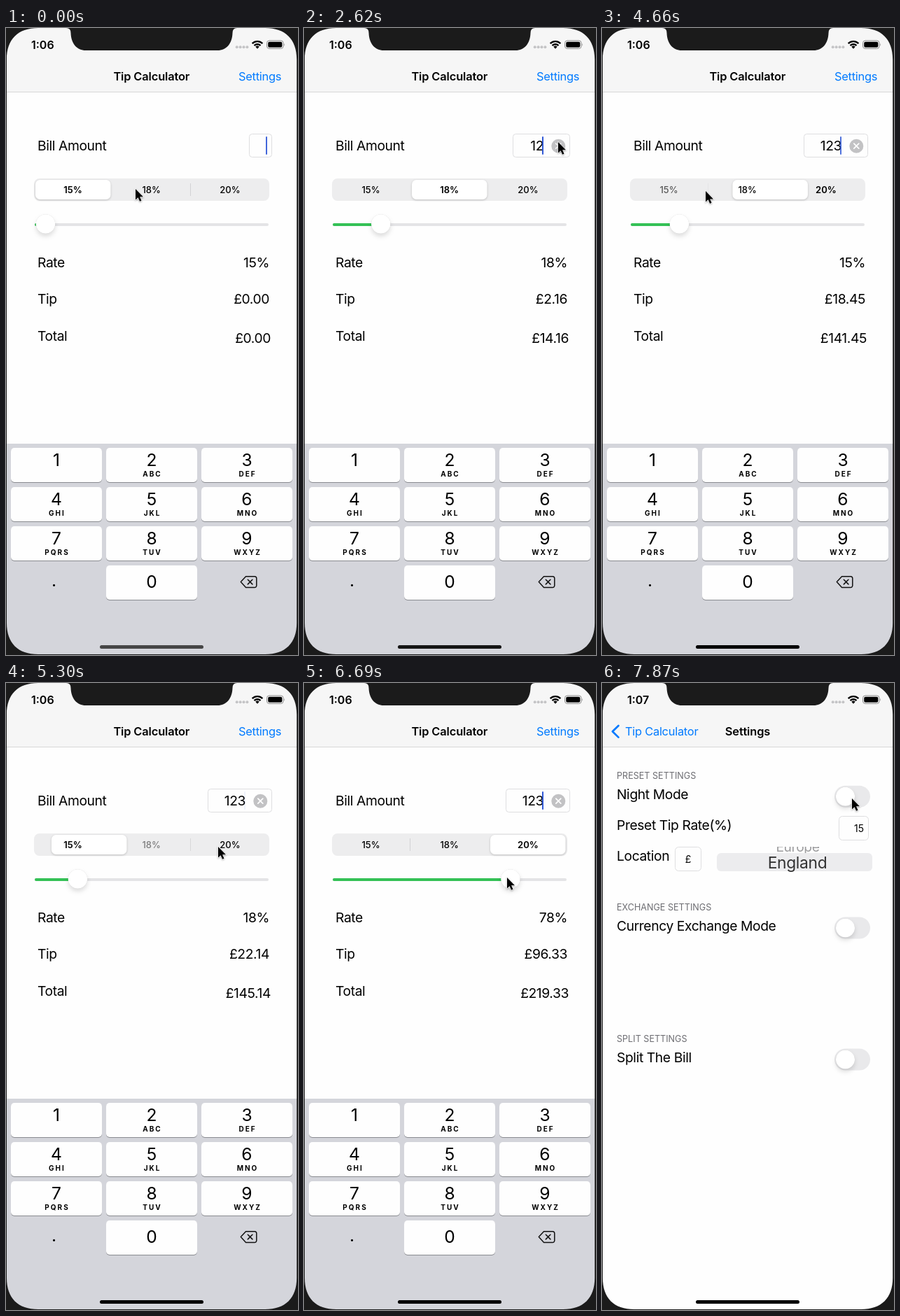
An HTML page for the animation above (8000 ms loop, 417 px wide and 896 px high).

```html
<!DOCTYPE html>
<html lang="en">
<head>
<meta charset="utf-8">
<title>Tip Calculator</title>
<style>
html, body { margin: 0; width: 100%; height: 100%; overflow: hidden; background: #1b1b1b; }
svg { display: block; width: 100%; height: 100%; }
text { font-family: Inter, Roboto, sans-serif; font-optical-sizing: none; white-space: pre; }
.body { font-size: 19.3px; letter-spacing: -.021em; }
.nav { font-size: 16.4px; letter-spacing: -.015em; }
.title { font-size: 16.4px; font-weight: 600; letter-spacing: -.008em; }
.clock { font-size: 16px; font-weight: 600; }
.seg { font-size: 13px; font-weight: 500; }
.head { font-size: 12.6px; fill: #6d6d72; }
.small { font-size: 14px; }
.digit { font-size: 24.6px; }
.abc { font-size: 10px; font-weight: 700; letter-spacing: 2px; }
.wheel { font-size: 22.8px; letter-spacing: -.015em; fill: #333; }
.blue { fill: #007aff; }
.end { text-anchor: end; }
.mid { text-anchor: middle; }
.box { fill: #fefefe; stroke: #dedee0; }
.knob { fill: #fff; filter: drop-shadow(0 1px 1.5px rgba(0,0,0,.2)); }
.thumb { fill: #fff; filter: drop-shadow(0 0 .5px rgba(0,0,0,.2)) drop-shadow(0 4px 3px rgba(0,0,0,.13)); }
</style>
</head>
<body>
<svg id="stage" viewBox="0 0 417 896"></svg>
<script>
const stage = document.getElementById('stage');
const text = (x, y, str, cls, id = '') =>
  `<text x="${x}" y="${y}" class="${cls}" id="${id}">${str}</text>`;
const rect = (x, y, w, h, r, attrs) =>
  `<rect x="${x}" y="${y}" width="${w}" height="${h}" rx="${r}" ${attrs}/>`;
const group = (id, ...parts) => `<g id="${id}">${parts.join('')}</g>`;

const clamp = v => Math.max(0, Math.min(1, v));
const mix = (a, b, u) => a + (b - a) * u;
const ramp = (t, from, to) => clamp((t - from) / (to - from));
const ease = u => u * u * (3 - 2 * u);

const LABELS = ['15%', '18%', '20%'];
const PRESETS = [.15, .18, .2];

function keypad() {
  const letters = ['', 'ABC', 'DEF', 'GHI', 'JKL', 'MNO', 'PQRS', 'TUV', 'WXYZ'];
  const key = (col, row, digit, sub) => {
    const x = 7 + col * 136, y = 600 + row * 56;
    return rect(x, y + 1, 130, 49, 5, 'fill="#898b90"') + rect(x, y, 130, 49, 5, 'fill="#fefefe"') +
      text(x + 65, y + (digit ? 26 : 32), digit, 'digit mid') + text(x + 66, y + 40.5, sub, 'abc mid');
  };
  return rect(0, 594, 417, 302, 0, 'fill="#d4d5db"') +
    letters.map((s, i) => key(i % 3, Math.floor(i / 3), i + 1, s)).join('') +
    key(1, 3, 0, '') + text(68.5, 798, '.', 'digit mid') +
    `<path d="M342.5 783.7H355a2.8 2.8 0 0 1 2.8 2.8V796.7a2.8 2.8 0 0 1-2.8 2.8H342.5L335.3 791.6Z
      M345.3 788.3l6.6 6.6m0-6.6l-6.6 6.6" fill="none" stroke="#111" stroke-width="1.5" stroke-linejoin="round" stroke-linecap="round"/>`;
}

function calculator() {
  return rect(0, 92, 417, 804, 0, 'fill="#fefefe"') +
    text(45, 175, 'Bill Amount', 'body') +
    rect(347.5, 151.5, 32, 33, 4, 'class="box" id="field"') +
    text(342, 175, '', 'body end', 'bill') +
    group('clear', '<circle cx="363.3" cy="168.7" r="10" fill="#c2c2c4"/>',
      '<path d="M359.8 165.2l7 7m0-7l-7 7" stroke="#fff" stroke-width="1.7" stroke-linecap="round"/>') +
    rect(371, 155, 2, 26, 1, 'fill="#3058d6" id="caret"') +
    rect(40, 215, 336, 32, 8, 'fill="#ededee"') +
    [0, 1].map(i => rect(151 + i * 112, 222, 1, 18, 0, `fill="#d2d2d4" id="divider${i}"`)).join('') +
    rect(42, 217, 107.5, 28, 6.5, 'class="knob" id="segKnob"') +
    LABELS.map((s, i) => text(95.5 + i * 112.2, 235.5, s, 'seg mid', 'seg' + i)).join('') +
    rect(41, 279, 334, 4, 2, 'fill="#e4e4e6"') +
    rect(41, 279, 20, 4, 2, 'fill="#34c156" id="fill"') +
    '<circle cy="280" r="13.7" class="thumb" id="thumb"/>' +
    text(45, 342, 'Rate', 'body') + text(376, 342, '', 'body end', 'rate') +
    text(45, 394, 'Tip', 'body') + text(376, 394, '', 'body end', 'tip') +
    text(45, 447, 'Total', 'body') + text(378, 450, '', 'body end', 'total') +
    rect(0, 92, 417, 804, 0, 'id="dim"') + keypad();
}

function settings() {
  const toggle = y => rect(332, y - 15.5, 51, 31, 15.5, 'fill="#e9e9eb"') +
    `<circle cx="347.5" cy="${y}" r="13.5" class="thumb"/>`;
  return rect(1, 92, 417, 804, 0, 'fill="#fefefe"') +
    text(21, 136.5, 'PRESET SETTINGS', 'head') +
    text(21, 166, 'Night Mode', 'body') + toggle(162.3) +
    text(21, 210, 'Preset Tip Rate(%)', 'body') +
    rect(338.5, 190.5, 42, 34, 5, 'class="box"') + text(374, 213, '15', 'small end') +
    text(21, 254, 'Location', 'body') +
    rect(104.5, 234.5, 37, 34, 5, 'class="box"') + text(123, 257, '£', 'small mid') +
    rect(164, 243, 222, 26, 6, 'fill="#ececee"') +
    `<g clip-path="url(#wheelTop)">${text(279.5, 240.5, '<tspan fill="#9c9c9e">Europe</tspan>', 'body mid')}</g>` +
    text(279, 265, 'England', 'wheel mid') +
    text(21, 324.5, 'EXCHANGE SETTINGS', 'head') +
    text(21, 354, 'Currency Exchange Mode', 'body') + toggle(350) +
    text(21, 512.5, 'SPLIT SETTINGS', 'head') +
    text(21, 542, 'Split The Bill', 'body') + toggle(538);
}

function statusBar() {
  const dots = [329.7, 334.6, 339.5, 344.4]
    .map(x => `<circle cx="${x}" cy="27.3" r="2" fill="#c4c4c6"/>`).join('');
  const arc = r => {
    const d = r * Math.SQRT1_2;
    return `M${359 - d} ${29.5 - d}A${r} ${r} 0 0 1 ${359 + d} ${29.5 - d}`;
  };
  return text(36, 29.6, '1:06', 'clock', 'clock') + dots +
    `<path d="${arc(6.3)}${arc(10.4)}" fill="none" stroke="#000" stroke-width="2.4"/>` +
    `<path d="${arc(3.8)}L359 29.8Z"/>` +
    rect(372.5, 18, 23.5, 11.5, 3.5, 'fill="none" stroke="#8c8c8c"') +
    rect(374.2, 19.7, 20.1, 8.1, 2, '') +
    '<path d="M397.3 21.7q1.6 2 0 4z" fill="#999"/>';
}

stage.innerHTML = `
  <defs>
    <clipPath id="wheelTop"><rect x="164" y="234" width="222" height="9"/></clipPath>
    <linearGradient id="shade"><stop stop-opacity="0"/><stop offset="1" stop-opacity=".07"/></linearGradient>
  </defs>` +
  group('pageCalc', calculator()) +
  group('pageSettings', settings()) +
  rect(0, 0, 417, 92, 0, 'fill="#f6f6f6"') + rect(0, 91, 417, 1, 0, 'fill="#d6d6d8"') +
  text(0, 75, 'Tip Calculator', 'title mid', 'title') +
  text(332, 75, 'Settings', 'nav blue', 'settingsLink') +
  text(0, 75, 'Tip Calculator', 'nav blue', 'backLabel') +
  text(0, 75, 'Settings', 'title mid', 'settingsTitle') +
  '<path id="chevron" d="M23.5 61L15 69.3 23.5 77.6" fill="none" stroke="#007aff" stroke-width="2.7" stroke-linecap="round" stroke-linejoin="round"/>' +
  rect(-9, 0, 9, 896, 0, 'fill="url(#shade)" id="edge"') +
  statusBar() +
  rect(134, 882, 148, 5, 2.5, 'id="home"') +
  `<path fill="#1b1b1b" fill-rule="evenodd" d="M0 0H417V896H0Z
    M1 45C1 16 17 0 46 0H370C399 0 415.2 16 415.2 45V850C415.2 879 399 895 370 895H46C17 895 1 879 1 850Z"/>
  <path fill="#1b1b1b" d="M86 0Q92.500 0 92.500 7C93 22 101 32 114 32H302C315 32 323 22 323.500 7Q323.500 0 330 0Z"/>
  <path id="cursor" d="M0 0V15.500L3.600 12.200 6 17.800 8.500 16.700 6.100 11.300H11Z" stroke="#fff" stroke-width="1.2"
    paint-order="stroke" style="filter:drop-shadow(0 1px 1px rgba(0,0,0,.3))"/>`;

const el = {};
stage.querySelectorAll('[id]').forEach(node => { if (node.id) el[node.id] = node; });
const set = (id, attrs) => { for (const k in attrs) el[id].setAttribute(k, attrs[k]); };
const write = (id, str) => { if (el[id].textContent !== str) el[id].textContent = str; };

const LOOP = 8000;
const PUSH = 7344;
const CLICKS = [[500, 1], [3900, 2], [4480, 0], [5170, 1], [5600, 2]];
const KEYS = [[2340, '1'], [2520, '12'], [2690, '123']];
const POINTER = [
  [820, 185, 230], [1240, 363, 163], [2920, 363, 163], [3400, 312, 234], [3560, 306, 233],
  [3850, 237, 232], [4160, 90, 232], [4450, 88, 232], [4840, 195, 234], [4960, 200, 234],
  [5300, 303, 234], [5480, 310, 234], [6000, 115, 278], [6200, 115, 278],
  [6640, 290, 278], [6710, 290, 278], [6960, 379, 63], [7530, 378, 63], [7830, 357, 165]
];

function pointerAt(t) {
  let [x, y] = POINTER[0].slice(1);
  for (let i = 1; i < POINTER.length; i++) {
    const u = ease(ramp(t, POINTER[i - 1][0], POINTER[i][0]));
    x = mix(x, POINTER[i][1], u);
    y = mix(y, POINTER[i][2], u);
  }
  return [x, y];
}

function caretAt(t) {
  if (t >= 2340 && t < 3190) return 1;
  const typed = t >= 3190;
  const p = (t + (typed ? 810 : 10)) % 1000;
  const back = typed ? 370 : 510;
  return 1 - ramp(p, 0, 120) + ramp(p, back, back + 120);
}

function drawCalculator(t) {
  let pos = 0, slider = .0065, rate = PRESETS[0], chosen = 0;
  const fade = [1, 1, 1];
  for (const [start, target] of CLICKS) {
    const u = ease(ramp(t, start, start + 450));
    pos = mix(pos, target, u);
    slider = mix(slider, PRESETS[target], u);
    if (t >= start) rate = PRESETS[target];
    if (u > .5) chosen = target;
    fade[target] -= .75 * (ramp(t, start - 130, start - 50) - ramp(t, start + 60, start + 300));
  }
  if (t > 6230) rate = slider = mix(.2, .7832, ease(ramp(t, 6230, 6670)));

  const bill = KEYS.reduce((s, [at, str]) => t >= at ? str : s, '');
  const fieldWidth = [32, 69, 81, 91][bill.length];
  const tip = bill * rate;
  write('bill', bill);
  write('rate', Math.round(rate * 100) + '%');
  write('tip', '£' + tip.toFixed(2));
  write('total', '£' + (+bill + tip).toFixed(2));
  set('field', { x: 379.5 - fieldWidth, width: fieldWidth });
  set('clear', { opacity: bill ? 1 : 0 });
  set('caret', { x: bill ? 340 : 371, opacity: caretAt(t) });

  set('segKnob', { x: 42 + pos * 112 });
  set('divider0', { opacity: clamp(pos - 1) });
  set('divider1', { opacity: clamp(1 - pos) });
  fade.forEach((o, i) => set('seg' + i, { opacity: o, 'font-weight': 500, style: i === chosen ? 'font-weight:600' : '' }));

  const x = 54.5 + slider * 307;
  set('thumb', { cx: x });
  set('fill', { width: x - 41 });
}

function drawPush(t) {
  // critically damped spring, cut after half a second
  const w = Math.max(0, t - PUSH) * .01826;
  const left = t > PUSH + 500 ? 0 : (1 + w) * Math.exp(-w);
  const done = 1 - left;
  const x = 414 * left;
  set('pageCalc', { transform: `translate(${-124 * done})` });
  set('pageSettings', { transform: `translate(${x})`, opacity: done > 0 ? 1 : 0 });
  set('dim', { opacity: .1 * done });
  set('edge', { transform: `translate(${x + 1})`, opacity: left > 0 && done > 0 ? 1 : 0 });
  set('title', { x: 207.8 - 122 * done ** 1.3, opacity: clamp(left * 1.5) });
  set('settingsLink', { opacity: left * left });
  set('backLabel', { x: 33 + 138 * left, opacity: done });
  set('settingsTitle', { x: 208 + 264 * left, opacity: done });
  set('chevron', { opacity: done });
}

function draw(t) {
  drawCalculator(t);
  drawPush(t);
  write('clock', t < 7040 ? '1:06' : '1:07');
  const grey = Math.round(70 * (1 - ramp(t, 2340, 2740)));
  set('home', { fill: `rgb(${grey},${grey},${grey})` });
  set('cursor', { transform: `translate(${pointerAt(t)})` });
}

const begin = performance.now();
function frame() {
  draw((performance.now() - begin) % LOOP);
  requestAnimationFrame(frame);
}
frame();
</script>
</body>
</html>
```
